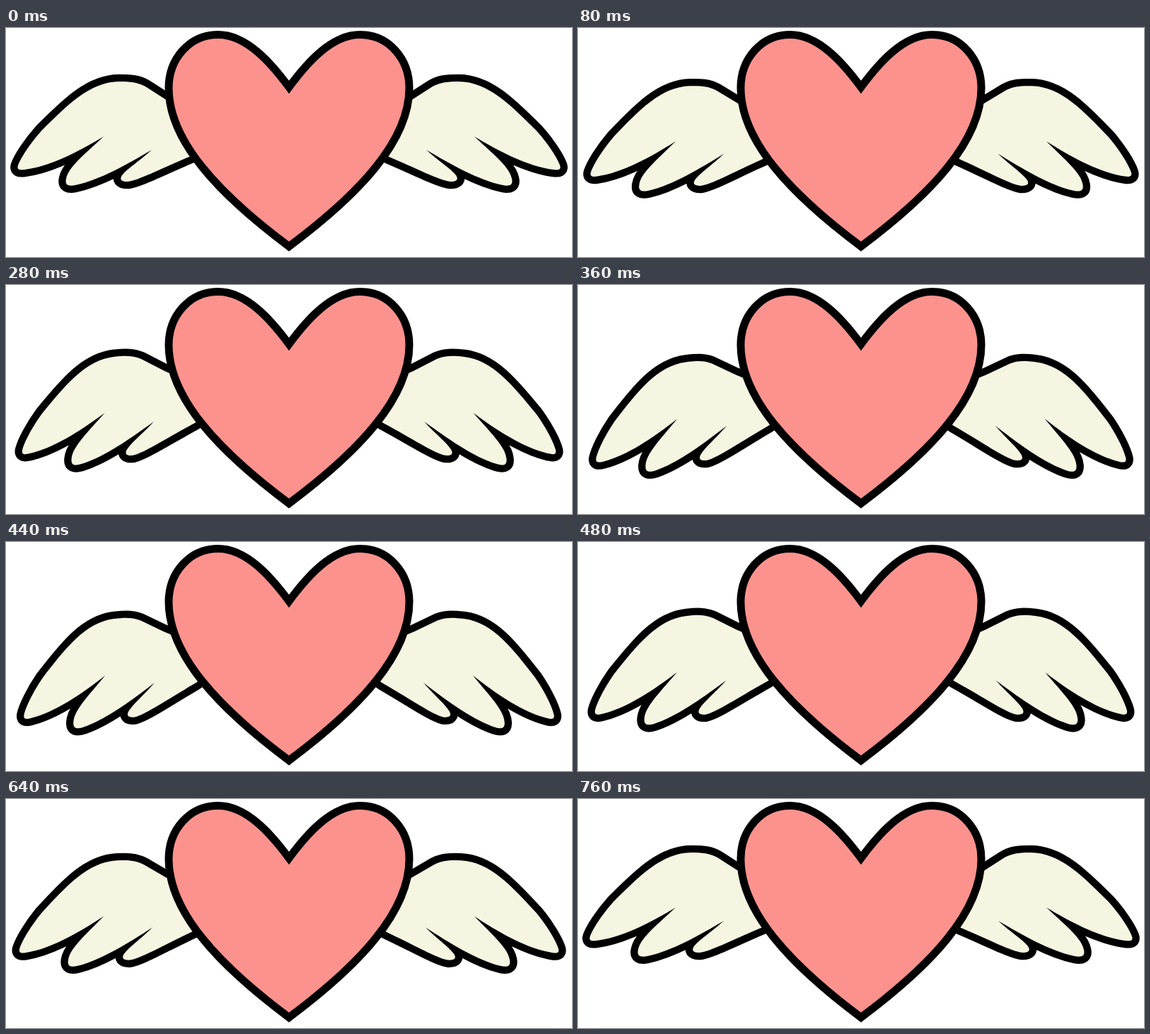
An HTML page for the animation above (800 ms loop, 800 by 325 pixels).

```html
<!DOCTYPE html>
<html lang="en">
<head>
<meta charset="utf-8">
<title>Winged heart</title>
<style>
  html, body { margin: 0; width: 100%; height: 100%; overflow: hidden; background: #fff; }
  svg { display: block; width: 100vw; height: 100vh; }
  .wing { fill: #f6f5e2; stroke: #000; stroke-width: 20.6; stroke-linejoin: round; paint-order: stroke; }
  .heart { fill: #fc928e; stroke: #000; stroke-width: 11; stroke-linejoin: miter; }
</style>
</head>
<body>
<svg viewBox="0 0 800 325">
  <defs>
    <path id="wing" class="wing" d="M275 130 L228 103 L197 83 C186 77 176 76 160 76
      C119 76 86 110 50 146 C34 164 21 184 17 195 C15 201 19 202 26 201
      C60 197 100 177 138 154 C108 182 88 198 85 214 C83 223 88 225 98 223
      C132 216 172 193 206 173 C187 190 172 199 164 209 C160 215 163 218 172 218
      C188 216 218 200 263 181 L300 163 Z"/>
  </defs>
  <use class="flap" href="#wing"/>
  <g transform="translate(800) scale(-1 1)"><use class="flap" href="#wing"/></g>
  <path class="heart" d="M400 84 C375 50 340 9.5 300 9.5 C258 9.5 230 45 230 85
    C230 160 300 235 400 310 C500 235 570 160 570 85
    C570 45 542 9.5 500 9.5 C460 9.5 425 50 400 84 Z"/>
</svg>
<script>
  const LOOP = 800, STEP = 40, SWING = 7.35;
  const PIVOT = '417 153';
  // [time in ms, share of the swing]
  const KEYS = [[0, 0], [80, 0.19], [200, 0.54], [360, 1], [400, 1.11],
                [480, 0.865], [640, 0.34], [760, 0], [800, 0]];
  const wings = document.querySelectorAll('.flap');

  function swingAt(t) {
    const i = KEYS.findIndex(key => key[0] > t);
    const [t0, v0] = KEYS[i - 1], [t1, v1] = KEYS[i];
    return v0 + (v1 - v0) * (t - t0) / (t1 - t0);
  }

  function draw(now) {
    const t = Math.floor((now % LOOP) / STEP) * STEP;
    const turn = `rotate(${-SWING * swingAt(t)} ${PIVOT})`;
    wings.forEach(wing => wing.setAttribute('transform', turn));
  }

  const start = performance.now();
  function tick() {
    draw(performance.now() - start);
    requestAnimationFrame(tick);
  }
  tick();
</script>
</body>
</html>
```
